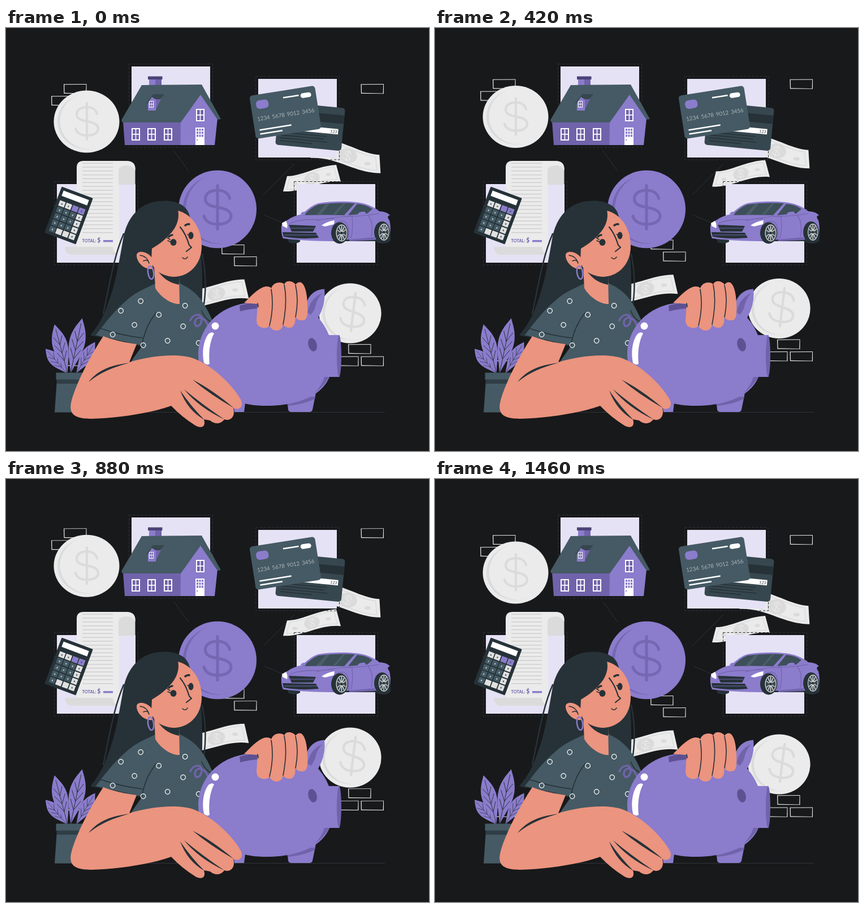
Write an HTML page that moves like this. It is 748 px wide and 748 px high and loops after 1500 ms.

```html
<!DOCTYPE html>
<html lang="en">
<head>
<meta charset="utf-8">
<title>Savings goals</title>
<style>
html, body { margin: 0; height: 100%; overflow: hidden; background: #18191b; }
svg { display: block; width: 100vw; height: 100vh; }
path, line { stroke-linejoin: round; }
.lilac { fill: #8b7ccc; }
.plum { fill: #7163ab; }
.slate { fill: #455a64; }
.ink { fill: #263238; }
.skin { fill: #eb947f; }
.pale { fill: #ebebeb; }
.line { fill: none; stroke: #263238; stroke-width: 1.6; stroke-linecap: round; }
.thin { stroke-width: .9; }
.thick { stroke-width: 3.5; }
.money { --face: #ebebeb; --shade: #dbdbdb; }
.token { --face: #8b7ccc; --shade: #7667b3; }
</style>
</head>
<body>
<svg viewBox="0 0 748 748">
<defs>
  <path id="brick" fill="#e8e8e8" fill-rule="evenodd" d="M0 .3L40.5 0V17.3L.4 17zM1.3 1.2L1.6 15.8 39.2 16.4 39.6 .9z"/>
  <path id="dollar" fill="none" stroke="var(--shade)" stroke-width="4.2" stroke-linecap="round" d="M18-13C16-21 9-25 0-25C-11-25-18-20-18-12.500C-18-4-10-2 0 0C11 2 20 5 20 13C20 21 11 25 0 25C-10 25-18 21-20 13M0-32V32"/>
  <g id="coin">
    <ellipse rx="58" ry="55" fill="var(--face)"/>
    <ellipse cx="1.500" rx="53" ry="49" fill="var(--shade)"/>
    <ellipse cx="5" cy="-1" rx="52" ry="49.500" fill="var(--face)"/>
  </g>
  <g id="bill">
    <path class="pale" d="M-44-4C-18-4 8-22 43-24L51 6C14 2-15 25-51 23z"/>
    <path fill="none" stroke="#dbdbdb" stroke-width="1.200" d="M-39-1C-16-2 9-18 39-20L45 2C12 0-15 20-45 19z"/>
    <ellipse rx="14" ry="10.500" fill="#dbdbdb" transform="rotate(-20)"/>
    <ellipse cx="29" cy="-7" rx="4.500" ry="2.700" fill="#dbdbdb"/>
    <ellipse cx="-30" cy="10" rx="4.500" ry="2.700" fill="#dbdbdb"/>
  </g>
  <g id="panel">
    <rect x="-4.500" y="-4.500" width="148" height="147.500" fill="none" stroke="#2b3136" stroke-dasharray="4 3"/>
    <rect width="139" height="139" fill="#e6e2f5"/>
  </g>
  <g id="window">
    <path fill="#fff" d="M0 0H15V22H0z"/>
    <path class="plum" d="M2 2H6.700V10H2zM8.300 2H13V10H8.300zM2 11.700H6.700V20H2zM8.300 11.700H13V20H8.300z"/>
  </g>
  <g id="wheel">
    <ellipse class="ink" rx="15" ry="19"/>
    <ellipse cx="3.500" rx="10" ry="15" fill="#dcdcdc"/>
    <ellipse cx="3.500" rx="8.800" ry="13.500" fill="#37474f"/>
    <path stroke="#dcdcdc" stroke-width="1.500" d="M3.500-13V13M-4-5L11 5M-4 6L11-6M-1-11L8 11M-1 11L8-11"/>
    <circle cx="3.500" r="2.500" class="ink"/>
  </g>
  <g id="leaf">
    <path class="lilac" d="M0 0C-4-18-15-38-14-60C-13-78-5-90 0-100C5-90 13-78 14-60C15-38 4-18 0 0"/>
    <path class="line thin" d="M0 0V-90M0-26L-9-44M0-26L9-44M0-42L-10-60M0-42L10-60M0-58L-8-75M0-58L8-75"/>
  </g>
</defs>

<path stroke="#2e3437" d="M86 679.500H670M297 217L323 253M455 295L510 240M457 331L490 345"/>

<g id="floating" class="money">
  <use href="#brick" x="102" y="99"/><use href="#brick" x="80" y="120"/>
  <use href="#brick" x="627.500" y="99"/>
  <use href="#brick" x="381" y="383"/><use href="#brick" x="403" y="404"/>
  <use href="#brick" x="605" y="559"/><use href="#brick" x="583" y="580.500"/>
  <use href="#brick" x="627.500" y="580.500"/><use href="#brick" x="102" y="580.500"/>
  <use href="#bill" transform="translate(372 470) rotate(2) scale(1.130)"/>
  <use href="#bill" transform="translate(541 266)"/>
  <use href="#bill" transform="translate(604 226) rotate(3) skewX(-9) scale(-1.260 1.200)"/>
  <g style="--shade:#ebebeb">
    <use href="#dollar" transform="translate(372 470) rotate(8) scale(.28)"/>
    <use href="#dollar" transform="translate(541 266) rotate(8) scale(.26)"/>
    <use href="#dollar" transform="translate(604 226) rotate(20) scale(.3)"/>
  </g>
  <use href="#coin" x="142.500" y="165.500"/>
  <use href="#dollar" x="143" y="165"/>
  <use href="#coin" transform="translate(608.500 504.500) scale(.95 .965)"/>
  <use href="#dollar" transform="translate(614 502) rotate(7) scale(1.050)"/>
</g>

<use href="#panel" x="222" y="68"/>
<use href="#panel" x="446" y="90"/>
<use href="#panel" x="90" y="276"/>
<use href="#panel" x="514" y="276"/>

<g id="house">
  <path class="plum" d="M207 165H312V207H210z"/>
  <path class="lilac" d="M309 165L344 115 374 160 369 207H308.500zM253 90H264V102H253z"/>
  <path class="plum" d="M264 90H275V102H264z"/>
  <path fill="#4c4377" d="M251 85.500H276.500V91H251z"/>
  <path class="slate" d="M240 101L346 100 380 161 374 162 344 118 309 167H206L204 163z"/>
  <path class="plum" d="M264 125L275 124 264 146z"/>
  <path class="lilac" d="M251 131L257 121 265 125V146H251z"/>
  <path fill="#37474f" d="M260 117H280L273 126H264L258 122 250 134 248 133z"/>
  <use href="#window" transform="translate(253 129) scale(.53)"/>
  <use href="#window" x="222" y="177"/><use href="#window" x="250" y="177"/><use href="#window" x="279" y="177"/>
  <use href="#window" x="336" y="143"/>
  <path fill="#fff" d="M335 176H351V207H335z"/>
  <path fill="none" stroke="#8b7ccc" stroke-width="3.200" stroke-dasharray="3.800 1.500" d="M338.500 178V194M343 178V194M347.500 178V194"/>
  <circle cx="338" cy="198" r="1" class="plum"/>
</g>

<g transform="translate(538 174) rotate(5.500)">
  <rect x="-58.500" y="-38" width="117" height="76" rx="5" fill="#37474f"/>
  <path class="ink" d="M-58.500-25H58.500V-10H-58.500z"/>
  <path fill="#fff" d="M-40 0H50V9.500H-40z"/>
  <path class="line" d="M-50 15H30M-50 20H26M-50 25H32M-50 30H5"/>
  <text x="36" y="7.500" class="ink" font-family="Lato, sans-serif" font-size="7" font-style="italic">123</text>
</g>
<g transform="translate(494 149) rotate(-9)">
  <rect x="-58.500" y="-38.500" width="117" height="77" rx="5" class="slate"/>
  <rect x="-49" y="-28" width="22" height="15" rx="6" class="lilac"/>
  <path stroke="#fff" stroke-width="2.500" d="M0-26H28M-50 24H7M-50 31H-10"/>
  <rect x="31" y="-28.500" width="19" height="8.500" rx="4.200" fill="#fff"/>
  <text x="-51" y="7.500" fill="#fff" font-family="Lato, sans-serif" font-size="9.700" font-weight="300" word-spacing="1.500">1234 5678 9012 3456</text>
</g>

<g id="receipt">
  <path fill="#dbdbdb" d="M104 387H196V401H118Q105 401 104 387z"/>
  <path class="pale" d="M125 387V247Q125 235 137 235H216V277H200V401Q189 398 189 387z"/>
  <path fill="#dbdbdb" d="M199 277V252Q200 235 215 235Q228.500 236 228.500 249V277z"/>
  <path class="pale" d="M199 250Q200 236 214 235.500Q228.500 236 228.500 249V252Q224 243 214 243Q203 243 199 250"/>
  <path stroke="#cfcfcf" stroke-width="54" stroke-dasharray="1.500 5.300" d="M162 238.500V366"/>
  <text x="134.500" y="379" fill="#6f60ac" font-family="Lato, sans-serif" font-weight="700" font-size="7.400">TOTAL: <tspan font-size="10.500">$</tspan></text>
  <path class="lilac" d="M172 375H189V378.500H172z"/>
</g>

<g transform="translate(111 331.500) rotate(20.500)">
  <rect x="-29.500" y="-43.500" width="59" height="87" rx="1.500" class="ink"/>
  <path fill="#fff" d="M-24-38H24V-28H-24z"/>
  <g transform="translate(0 2)">
    <g fill="none" stroke-width="10.500" stroke-dasharray="10 2">
      <path stroke="#455a64" d="M-18.500-22V36M-6.200-22V36M6.200-22V36"/>
      <path stroke="#e0e0e0" d="M18.500-22V36M6.200 26V36M-6.200 26V36M-18.500-22V-12M-6.200-22V-12"/>
      <path stroke="#8b7ccc" d="M6.200-22V-12M18.500-22V-12"/>
    </g>
    <path stroke="#c5cdd1" stroke-width="2" stroke-dasharray="2.500 9.500" d="M-18.500-6V36M-6.200-6V24M6.200-6V24"/>
    <path stroke="#455a64" stroke-width="2" stroke-dasharray="2.500 9.500" d="M18.500-18V36M-18.500-18V-14M-6.200-18V-14"/>
  </g>
</g>

<g id="car">
  <path class="ink" d="M492 360H520V378Q512 383 500 379zM650 350H680V376Q672 384 655 379zM570 364H660V377H570z"/>
  <path class="lilac" d="M487 350Q488 344 497 340Q508 332 524 329Q540 313 552 310C580 305 622 306 638 312Q652 317 660 324Q674 325 679 331Q672 333 678 340Q681 350 679 364L660 374H606L575 377Q530 377 490 372Q486 364 487 350z"/>
  <path fill="#3d4f58" d="M526 331Q541 316 553 312Q584 308 617 310L598 331Q560 330 526 331zM605 331L621 311Q637 312 648 320L639 328z"/>
  <path fill="#607680" d="M549 330L566 311 573 310 557 330zM578 330L596 310 600 310 583 330z" opacity=".4"/>
  <path class="ink" d="M500 348L548 350 543 360H505zM489 361L548 362 553 371Q520 374 491 369z"/>
  <path stroke="#7163ab" stroke-width="1.200" fill="none" d="M501 346Q520 337 555 339L597 333Q626 334 660 328M549 341Q562 337 580 337M606 373Q608 346 598 342Q584 340 577 352M612 333Q614 357 610 372M640 331Q651 343 646 369M500 354H545M492 366H550"/>
  <path fill="#fff" d="M558 349Q568 342 581 340L580 347 564 351zM488 345L495 341Q499 347 497 354L489 350z"/>
  <path class="lilac" d="M622 329Q625 324 635 325L637 330 624 331zM521 329Q523 324 531 325L529 331z"/>
  <path class="plum" d="M607 374L652 370V375L607 377z"/>
  <use href="#wheel" x="590" y="362.500"/>
  <use href="#wheel" transform="translate(665 361) scale(.93 1)"/>
</g>

<g class="token">
  <use href="#coin" transform="translate(374 320.500) scale(1.190 1.250)"/>
  <use href="#dollar" transform="translate(374 317) scale(1.200)"/>
</g>

<g id="plant">
  <use href="#leaf" transform="translate(108 611) rotate(-41) scale(.75 .58)"/>
  <use href="#leaf" transform="translate(124 611) rotate(31) scale(.75 .65)"/>
  <use href="#leaf" transform="translate(109 611) rotate(-15) scale(.95 .9)"/>
  <use href="#leaf" transform="translate(114 611) rotate(12)"/>
  <path class="slate" d="M88.500 609.500H152V622H148V679.500H86L90 622H88.500z"/>
  <path fill="#2f3e46" d="M90 621.500H150V629H89.500z"/>
</g>

<g id="woman">
  <path class="ink" d="M324 330C319 312 298 303 272 306C231 309 212 342 207 374C200 414 193 455 180 488C172 513 160 530 149 543C158 547 172 546 180 540L262 480L346 496Q349 450 345 400z"/>
  <path class="line" style="stroke-width:2.500" d="M208 364C190 405 182 460 172 505M347 400C354 435 354 470 348 500"/>
  <path class="slate" d="M264 452C245 461 228 468 214 481C191 500 175 522 158 544L240 563Q228 580 214 600H346L366 520C352 486 338 465 306 451z"/>
  <path class="line" d="M166 531Q205 544 241 548M240 562Q246 527 266 503M159 544L240 562M346 500Q352 515 364 520"/>
  <path fill="none" stroke="#fff" stroke-width="1.200" d="M242.500 483a4.300 4.300 0 1 0 0 .1M207.500 500a4.300 4.300 0 1 0 0 .1M231.500 525a4.300 4.300 0 1 0 0 .1M193 542a4.300 4.300 0 1 0 0 .1M274.500 507a4.300 4.300 0 1 0 0 .1M321 491a4.300 4.300 0 1 0 0 .1M317.500 527.500a4.300 4.300 0 1 0 0 .1M290 553a4.300 4.300 0 1 0 0 .1M247 561a4.300 4.300 0 1 0 0 .1M345 557a4.300 4.300 0 1 0 0 .1"/>
  <path class="skin" d="M262 420L264 460C275 478 294 489 307 488L306 435z"/>
  <path class="ink" d="M264 422Q282 441 306 438V454Q278 449 264 422"/>
  <path class="skin" d="M259 408C251 394 231 392 231 402C231 415 245 428 259 426z"/>
  <path class="skin" d="M304 323C331 330 347 357 346 388C345 420 322 440 296 440C274 438 261 428 257 413L258 390C278 378 302 362 304 323z"/>
  <path class="ink" d="M304 322C309 344 294 367 272 377L270 350z"/>
  <path class="line" d="M237 402Q249 403 253 416M243 412Q249 409 252 413M312 406Q317 411 321 405M286 376L293 379M284 370L290 374M321 365L327 367"/>
  <path class="line" style="stroke-width:2.200" d="M308 352Q318 364 324 384L328 388 319 395"/>
  <path class="line thick" d="M317 349Q321 346 324 347M288 369Q291 366 294 366"/>
  <ellipse class="ink" cx="296" cy="379" rx="5.500" ry="6"/>
  <ellipse class="ink" cx="327" cy="367" rx="4.500" ry="6.500"/>
  <ellipse cx="256" cy="432.500" rx="5" ry="11.500" fill="none" stroke="#8b7ccc" stroke-width="2.500" transform="rotate(-8 256 432)"/>
</g>

<g id="pig">
  <path fill="none" stroke="#7163ab" stroke-width="3.500" stroke-linecap="round" d="M326 517C331 505 346 503 346 516C345 529 333 531 334 520C336 509 351 509 357 526"/>
  <path class="lilac" d="M400 655H424L421 679H404zM496 645H548L542 675Q541 679 536 679H505Q500 679 499 675z"/>
  <path class="plum" d="M495 652H547L546 656Q525 666 498 668z"/>
  <path class="lilac" d="M340 577C340 531 376 487 440 485L530 490Q537 463 563 461.500Q566 489 552 512Q565 527 571 543H590V617H572C560 647 522 668 459 668C395 668 340 635 340 577z"/>
  <path class="plum" d="M533 503Q538 478 559 469Q549 480 547 493Q545 500 539 507zM572 617Q562 634 546 645Q560 630 563 617z"/>
  <ellipse cx="589" cy="580" rx="4" ry="36.500" class="plum"/>
  <ellipse cx="542" cy="560" rx="7.500" ry="12" fill="#5d5193" transform="rotate(-15 542 560)"/>
  <path fill="#5d5193" d="M413 491Q428 486 446 486L445 496Q428 497 414 501z"/>
  <circle cx="370" cy="527" r="6.500" fill="#fff"/>
  <path fill="#fff" d="M358 541Q364 536 368 540C360 555 358 575 360 594Q355 597 350 592C346 573 349 553 358 541"/>
</g>

<g id="hands">
  <path class="skin" d="M421 486C434 474 446 459 460 457Q467 457 469 460Q473 450 483 450Q489 450 492 453Q495 447 503 448Q509 449 512 454Q516 448 522 450C532 456 534 484 533 505Q532 518 523 517Q515 517 512 511L511 521Q508 531 499 530Q493 529 490 524Q488 536 477 535Q469 534 466 526Q462 532 453 530Q443 528 443 517L445 488z"/>
  <path class="line" d="M469 462C473 486 470 510 466 526M492 454C497 478 494 504 490 524M512 455C517 476 515 496 512 511M445 487L446 493"/>
  <path class="skin" d="M172 545C202 556 220 557 231 559L218 591C256 579 305 575 331 584C364 596 400 630 415 657C421 670 412 677 402 672C406 687 397 696 386 692C380 701 369 701 361 694L350 692C354 705 346 709 335 703Q311 688 292 668C260 680 200 690 150 691C122 691 111 683 115 663C121 634 150 578 172 545z"/>
  <g class="ink">
    <path d="M146 626C164 603 188 596 218 592C190 600 168 608 146 626"/>
    <path d="M308 641Q328 670 351 693Q321 676 308 641M315 639Q346 665 386 692Q341 671 315 639M330 622Q364 639 403 672Q361 648 330 622"/>
  </g>
</g>
</svg>
<script>
const floating = document.getElementById('floating');
const LOOP = 1500, STEPS = 36, RISE = 14.8;

// Linear rise and fall, held on film-rate steps.
function draw(now) {
  const step = Math.floor((now % LOOP + 5) / LOOP * STEPS) % STEPS;
  const phase = step / (STEPS - 1);
  const lift = RISE * (1 - Math.abs(1 - 2 * phase));
  floating.setAttribute('transform', `translate(0 ${-lift})`);
  requestAnimationFrame(draw);
}
draw(performance.now());
</script>
</body>
</html>
```
